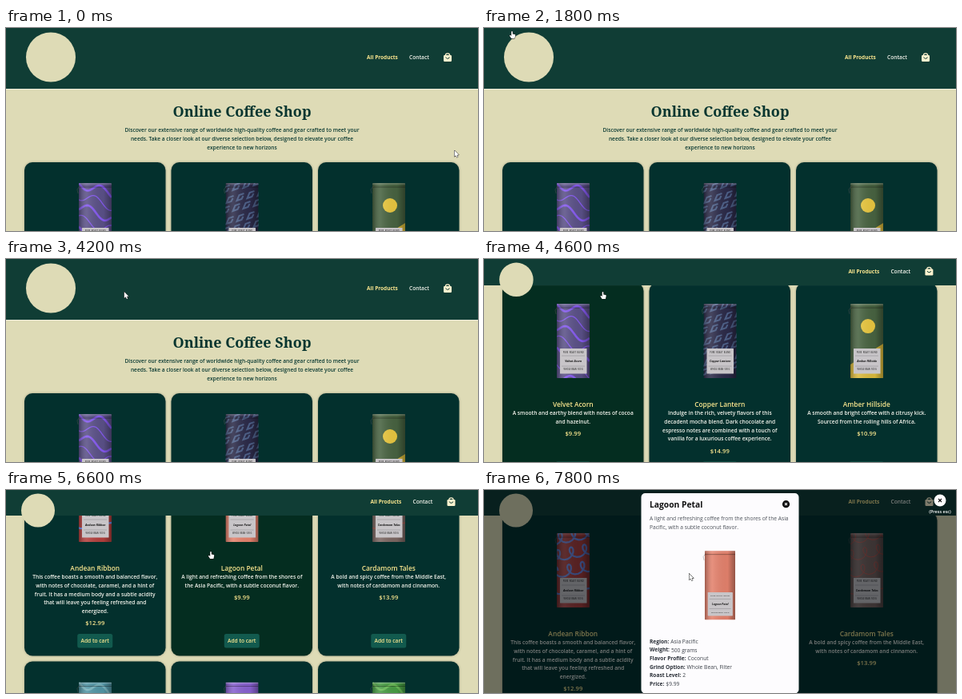
An HTML page with a canvas for the animation above (8000 ms loop, 590x254 px).

```html
<!DOCTYPE html>
<html lang="en">
<head>
<meta charset="utf-8">
<title>Online Coffee Shop</title>
<style>
  html, body { margin: 0; width: 100%; height: 100%; overflow: hidden; background: #dedbb6; }
  canvas { display: block; }
</style>
</head>
<body>
<canvas id="stage" width="590" height="254"></canvas>
<script>
const g = document.getElementById('stage').getContext('2d');
const LOOP = 8000, STEP = 200;
const CREAM = '#dedbb6', YELLOW = '#fbe78f', WHITE = '#f6f6ee';
const SANS = '"Open Sans", "Noto Sans", sans-serif';
const SERIF = '"Noto Serif", serif';
const CARD_X = [23, 206.5, 390], CARD_W = 176.5;

// ---------- motion ----------
const clamp = v => Math.max(0, Math.min(1, v));
const mix = (a, b, k) => a + (b - a) * k;
const ease = v => (v = clamp(v)) < 0.5 ? 4 * v ** 3 : 1 - 4 * (1 - v) ** 3;

// Each wheel notch moves the page by one tick.
const TICK = 88.5;
const NOTCHES = [[4200, 1], [4534, 1], [4780, 1], [5000, 1], [5200, 1], [6534, -1]];
const scrollAt = t => NOTCHES.reduce((sum, [start, dir]) => sum + dir * TICK * ease((t - start) / 250), 0);
const shrinkAt = t => ease((t - 4200) / 490);
const modalAt = t => clamp((t - 7200) / 400);

const POINTER = [
  [0, 560.5, 153], [200, 560, 153], [600, 330, 80], [1000, 62, 42], [1400, 50, 26],
  [1800, 35, 4], [2400, 60, 30], [2800, 120, 40], [3200, 146, 41], [4600, 148.5, 41],
  [5000, 149, 41], [5600, 170, 57], [6600, 256, 77], [7200, 256.5, 104.5], [8000, 256.5, 104.5]
];
function pointerAt(t) {
  const i = POINTER.findIndex(p => p[0] > t);
  const [t0, x0, y0] = POINTER[i - 1], [t1, x1, y1] = POINTER[i];
  const k = (t - t0) / (t1 - t0);
  return { x: mix(x0, x1, k), y: mix(y0, y1, k) };
}

// ---------- drawing helpers ----------
function text(str, x, cy, size, color, weight = 600, align = 'center', family = SANS) {
  g.font = `${weight} ${size}px ${family}`;
  g.textAlign = align;
  g.fillStyle = color;
  g.fillText(str, x, cy + size * 0.36);
}
function box(x, y, w, h, color, r = 0) {
  g.fillStyle = color;
  g.beginPath();
  g.roundRect(x, y, w, h, r);
  g.fill();
}
function disc(x, y, r, color) {
  g.fillStyle = color;
  g.beginPath();
  g.arc(x, y, r, 0, 7);
  g.fill();
}
function line(points, color, width = 1) {
  g.strokeStyle = color;
  g.lineWidth = width;
  g.beginPath();
  points.forEach(([x, y]) => g.lineTo(x, y));
  g.stroke();
}
function cross(x, y, r, color) {
  line([[x - r, y - r], [x + r, y + r]], color, 1.1);
  line([[x + r, y - r], [x - r, y + r]], color, 1.1);
}
const curve = (n, f) => Array.from({ length: n + 1 }, (_, i) => f(i / n));

// ---------- bag patterns, in a 41 x 93 space ----------
const waves = color => () => {
  for (let i = -1; i < 7; i++)
    line(curve(24, k => [k * 41, i * 15 + 14 * k + 6 * Math.sin(k * 7 + i * 1.3)]), color, i % 2 ? 1.3 : 2.6);
};
const tiles = color => () => {
  for (let row = 0; row < 7; row++)
    for (let col = 0; col < 4; col++) {
      const x = col * 13 - 4 + (row % 2) * 5, y = row * 13 + 3 - col * 3;
      line([[x + 9, y], [x + 3, y + 2], [x, y + 9], [x + 6, y + 7], [x + 8, y + 3]], color, 2);
    }
};
const swirls = (color, width) => () => {
  for (let i = 0; i < 4; i++)
    line(curve(40, k => [
      -4 + 50 * k + 6 * Math.sin(k * 19 + i), 8 + i * 21 - 10 * k + 7 * Math.cos(k * 19 + i)
    ]), color, width);
};
const emblem = () => {
  g.fillStyle = '#d9b93c';
  g.beginPath();
  g.moveTo(41, 50); g.lineTo(41, 93); g.lineTo(0, 93); g.lineTo(0, 76);
  g.fill();
  disc(22, 28, 9, '#e8c63f');
};
const plain = () => {};

const product = (name, price, lines, color, pattern) => ({ name, price, lines, color, pattern });
const ROWS = [
  { top: 168, height: 251, items: [
    product('Velvet Acorn', '$9.99',
      ['A smooth and earthy blend with notes of cocoa', 'and hazelnut.'], '#5a5087', waves('#8459ee')),
    product('Copper Lantern', '$14.99',
      ['Indulge in the rich, velvety flavors of this', 'decadent mocha blend. Dark chocolate and',
       'espresso notes are combined with a touch of', 'vanilla for a luxurious coffee experience.'],
      '#2b2a48', tiles('#4d6088')),
    product('Amber Hillside', '$10.99',
      ['A smooth and bright coffee with a citrusy kick.', 'Sourced from the rolling hills of Africa.'],
      '#476240', emblem)
  ] },
  { top: 426, height: 261.5, items: [
    product('Andean Ribbon', '$12.99',
      ['This coffee boasts a smooth and balanced flavor,', 'with notes of chocolate, caramel, and a hint of',
       'fruit. It has a medium body and a subtle acidity', 'that will leave you feeling refreshed and',
       'energized.'], '#b33f3d', swirls('#6f8ff0', 2.2)),
    product('Lagoon Petal', '$9.99',
      ['A light and refreshing coffee from the shores of', 'the Asia Pacific, with a subtle coconut flavor.'],
      '#e3816c', plain),
    product('Cardamom Tales', '$13.99',
      ['A bold and spicy coffee from the Middle East,', 'with notes of cardamom and cinnamon.'],
      '#7b6661', swirls('#c7544a', 0.9))
  ] },
  { top: 694.5, height: 262, items: [
    product('', '', [], '#5295a5', waves('#79b3bd')),
    product('', '', [], '#8761cf', plain),
    product('', '', [], '#479b43', waves('#6bbb58'))
  ] }
];
const FEATURED = ROWS[1].items[1];

function bag(item, x, y, scale = 1) {
  g.save();
  g.translate(x, y);
  g.scale(scale, scale);
  g.save();
  g.beginPath();
  g.roundRect(0, 0, 41, 93, 1);
  g.clip();
  box(0, 0, 41, 93, item.color);
  item.pattern();
  const shade = g.createLinearGradient(0, 0, 41, 0);
  shade.addColorStop(0, 'rgba(0,0,0,.3)');
  shade.addColorStop(0.25, 'rgba(255,255,255,.12)');
  shade.addColorStop(0.75, 'rgba(0,0,0,.03)');
  shade.addColorStop(1, 'rgba(0,0,0,.35)');
  box(0, 0, 41, 93, shade);
  line([[0, 5], [41, 5]], 'rgba(0,0,0,.35)', 1);
  line([[0, 1], [41, 1]], 'rgba(255,255,255,.3)', 1);
  g.restore();
  line([[1, 4], [-2, 8], [-1, 13]], 'rgba(100,90,90,.7)', 0.6);
  if (item.name) {
    box(4, 56, 33.5, 31.5, '#c8c5c8', 0.5);
    text('PURE  ROAST  BLEND', 20.7, 60.5, 2.6, '#444');
    line([[6, 65], [35, 65]], '#77747a', 0.4);
    text(item.name, 20.7, 72, 3.6, '#151515', 'italic 700');
    line([[6, 78], [35, 78]], '#77747a', 0.4);
    text('WHOLE BEAN  500 G', 20.7, 82.5, 2.5, '#444');
  }
  g.restore();
}

// ---------- page parts ----------
function card(item, x, y, height, hovered) {
  const cx = x + CARD_W / 2;
  g.save();
  g.shadowColor = 'rgba(0,0,0,.3)';
  g.shadowBlur = 3;
  box(x, y, CARD_W, height, hovered ? '#042d20' : '#03302d', 10);
  g.restore();
  bag(item, x + 68, y + 26);
  if (!item.name) return;
  text(item.name, cx, y + 152, 8.4, YELLOW);
  item.lines.forEach((str, i) => text(str, cx, y + 163 + i * 10.6, 6.65, WHITE));
  text(item.price, cx, y + 167.4 + item.lines.length * 10.6, 7.7, YELLOW);
  box(cx - 22, y + height - 27.5, 44, 17.5, '#125a4e', 2.5);
  text('Add to cart', cx, y + height - 18.7, 6.65, YELLOW);
}

function header(shrink) {
  const height = mix(76, 32, shrink);
  box(0, 0, 590, height, '#103d35');
  box(0, height, 590, 1, `rgba(240,240,225,${0.9 * (1 - shrink)})`);
  disc(mix(56, 40, shrink), mix(36.5, 25.5, shrink), mix(31, 21, shrink), CREAM);
  const y = mix(37, 15, shrink), dx = 4.5 * shrink;
  text('All Products', 451 + dx, y, 6.5, YELLOW, 700, 'left');
  text('Contact', 504 + dx, y, 6.65, WHITE, 600, 'left');
  const x = 552 + dx;
  g.strokeStyle = '#fdf3cf';
  g.lineWidth = 1.2;
  g.beginPath();
  g.arc(x, y - 2.5, 2.7, Math.PI, 0);
  g.stroke();
  box(x - 5, y - 3, 10, 8, '#fdf3cf', 1.2);
  g.strokeStyle = '#103d35';
  g.lineWidth = 1;
  g.beginPath();
  g.arc(x, y - 1, 2.3, 0.2, Math.PI - 0.2);
  g.stroke();
}

function modal(alpha) {
  g.save();
  g.globalAlpha = alpha;
  box(0, 0, 590, 254, 'rgba(0,4,8,.5)');
  disc(570, 13, 7.5, '#fff');
  cross(570, 13, 2, '#111');
  text('(Press esc)', 570, 27, 5.5, '#fff');
  box(196.5, 4, 197, 250.5, '#fdfcfe', 5);
  text(FEATURED.name, 207, 18.5, 10.3, '#111', 700, 'left');
  disc(377.5, 17.7, 4.6, '#0b0b0b');
  cross(377.5, 17.7, 1.5, '#fff');
  ['A light and refreshing coffee from the shores of the Asia', 'Pacific, with a subtle coconut flavor.']
    .forEach((str, i) => text(str, 207, 35.5 + i * 10.6, 6.7, '#4b5058', 400, 'left'));
  bag(FEATURED, 276, 76, 0.93);
  [['Region:', 'Asia Pacific'], ['Weight:', '500 grams'], ['Flavor Profile:', 'Coconut'],
   ['Grind Option:', 'Whole Bean, Filter'], ['Roast Level:', '2'], ['Price:', '$9.99']]
    .forEach(([label, value], i) => {
      const y = 189.5 + i * 10.6;
      text(label, 207, y, 6.6, '#2b3038', 700, 'left');
      text(value, 209 + g.measureText(label).width, y, 6.7, '#3d424a', 400, 'left');
    });
  g.restore();
}

const ARROW = new Path2D('M0 0V8L1.9 6.3L3.1 9L4.4 8.4L3.2 5.8H5.6Z');
const HAND = new Path2D('M-.8 .6Q0-.5.8.6V3.4L3.6 4Q4.4 4.2 4.2 5.2L3.4 9H-.9L-3 5.8Q-3 4.6-1.9 5L-.8 6Z');
function pointer({ x, y }, hand) {
  const shape = hand ? HAND : ARROW;
  g.save();
  g.translate(x, y);
  g.lineJoin = 'round';
  g.lineWidth = 1;
  g.strokeStyle = '#111';
  g.stroke(shape);
  g.fillStyle = '#fff';
  g.fill(shape);
  g.restore();
}

function draw(t) {
  const shrink = shrinkAt(t), opacity = modalAt(t), mouse = pointerAt(t);
  const shift = -44 * shrink - scrollAt(t);
  const headerHeight = mix(76, 32, shrink);
  const overLogo = shrink === 0 && mouse.x > 25 && mouse.x < 88 && mouse.y < 68;
  let overCard = false;

  box(0, 0, 590, 254, CREAM);
  text('Online Coffee Shop', 295, 105 + shift, 18, '#06352f', 700, 'center', SERIF);
  ['Discover our extensive range of worldwide high-quality coffee and gear crafted to meet your',
   'needs. Take a closer look at our diverse selection below, designed to elevate your coffee',
   'experience to new horizons']
    .forEach((str, i) => text(str, 295, 128 + shift + i * 10.6, 6.6, '#0b3a33'));

  for (const { top, height, items } of ROWS) {
    const y = top + shift;
    if (y > 254 || y + height < 0) continue;
    items.forEach((item, i) => {
      const x = CARD_X[i];
      const hovered = !opacity && mouse.y > headerHeight && mouse.y > y && mouse.y < y + height &&
        mouse.x > x && mouse.x < x + CARD_W;
      overCard ||= hovered;
      card(item, x, y, height, hovered);
    });
  }
  header(shrink);
  if (opacity) modal(opacity);
  pointer(mouse, overLogo || overCard);
}

function frame(now) {
  draw(Math.floor(now % LOOP / STEP) * STEP);
  requestAnimationFrame(frame);
}
requestAnimationFrame(frame);
</script>
</body>
</html>
```
